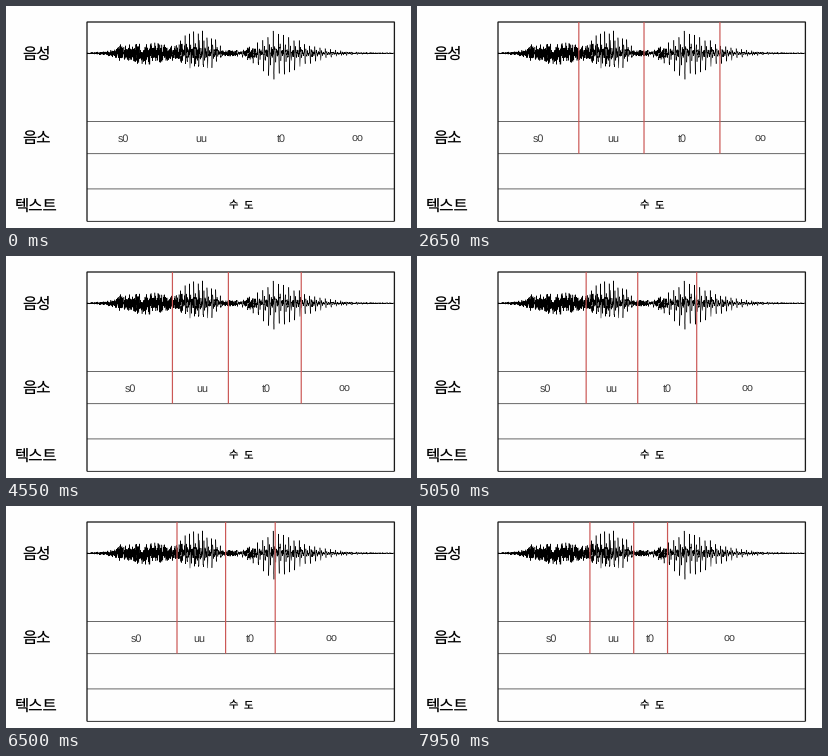
These frames come from a looping animation (405 by 222 pixels, 8000 ms). A matplotlib script:

```python
import numpy as np
import matplotlib.pyplot as plt
from matplotlib.animation import FuncAnimation

W, H, DPI = 405, 222, 100
STEP, LOOP = 50, 8000
PX = 72 / DPI  # points per pixel
LEFT, RIGHT, TOP, SPLIT, BOTTOM = 81, 388.4, 16, 147.6, 215.4
MID = 47.2
CJK = "Noto Sans CJK JP"

plt.rcParams["text.hinting"] = "none"
fig = plt.figure(figsize=(W / DPI, H / DPI), dpi=DPI, facecolor="#fefefe")
ax = fig.add_axes([0, 0, 1, 1])
ax.set_xlim(0, W)
ax.set_ylim(H, 0)
ax.axis("off")


def line(xs, ys, color, width, z=2):
    return ax.plot(xs, ys, color=color, lw=width * PX, zorder=z, snap=False,
                   solid_capstyle="butt", solid_joinstyle="miter")[0]


def label(x, y, text, size, font=CJK, color="black"):
    return ax.text(x, y, text, fontsize=size * PX, family=font, color=color,
                   ha="center", va="baseline", zorder=4)


def bump(x, centre, height, rise, fall, power):
    d = np.where(x < centre, (centre - x) / rise, (x - centre) / fall)
    return height * np.exp(-d ** power)


def voice(x, period, envelope, depth):
    """Ringing pulses whose lower half is scaled by depth."""
    ph = (x / period) % 1
    ring = np.cos(6 * np.pi * ph) * np.exp(-3 * ph)
    return envelope * np.where(ring < 0, ring * depth, ring)


def waveform():
    rng = np.random.default_rng(7)
    x = np.linspace(LEFT, RIGHT - 1, 3000)
    uu = bump(x, 192, 21, 22, 22, 4)
    oo = bump(x, 267, 21, 20, 40, 1.5)
    hiss = (.4 + bump(x, 139, 9, 30, 36, 2) + bump(x, 113.5, 4, 2, 2, 2)
            + bump(x, 225, 2, 8, 8, 2) + bump(x, 243, 4, 4, 6, 2)
            + .15 * (uu + oo))
    noise = hiss * np.clip(rng.normal(0, .55, x.size), -1.2, 1.2)
    wave = noise + voice(x - 174.5, 4.4, uu, 1.1) + voice(x - 251.5, 5.2, oo, 1.75)
    return x, MID - wave


# table
for y in (115.5, SPLIT, 182.9):
    line([LEFT, RIGHT], [y, y], "#6a6a6a", 1)
line([LEFT, LEFT, RIGHT, RIGHT], [BOTTOM, TOP, TOP, BOTTOM], "#1a1a1a", 1.3)
line([LEFT, RIGHT], [BOTTOM, BOTTOM], "#333333", 1)
line(*waveform(), "black", .5, 3)

for y, word in ((52.4, "음성"), (136.8, "음소"), (204.3, "텍스트")):
    label(30.6, y, word, 15.5)
for x, word in ((227.2, "수"), (242.2, "도")):
    label(x, 202.5, word, 10.3)

# divider and phoneme positions at each stage of the alignment
DIVIDERS = np.array([[154.3, 234.6, 315.3], [166.4, 222.4, 295.4],
                     [171, 219.6, 269.2], [173, 216.6, 249.8]])
CENTRES = np.array([[117.2, 195.2, 275, 351.5], [123.9, 196.5, 260.2, 338.8],
                    [130.6, 193.6, 244.4, 325.2], [134.2, 196.2, 233.2, 312.2]])
STARTS, SPAN = (2110, 4530, 6820), 1500

bars = [line([0, 0], [TOP, SPLIT], "#cb5856", 1.2, 3.5) for _ in range(3)]
names = [label(0, 136, s, 10.8, "Liberation Sans", "#3a3a3a")
         for s in ("s0", "uu", "t0", "oo")]


def ease(u):
    """Cubic Bezier easing with handles (.25, .1) and (.25, 1)."""
    s = np.linspace(0, 1, 400)
    r = 1 - s
    x = .75 * r * r * s + .75 * r * s * s + s ** 3
    y = .3 * r * r * s + 3 * r * s * s + s ** 3
    return np.interp(u, x, y)


def blend(poses, t):
    weights = ease((t - np.array(STARTS)) / SPAN)
    return poses[0] + weights @ np.diff(poses, axis=0)


def draw(i):
    t = i * STEP
    alpha = np.clip((t - 150) / 350, 0, 1)
    for bar, x in zip(bars, blend(DIVIDERS, t)):
        bar.set_xdata([x, x])
        bar.set_alpha(alpha)
    for name, x in zip(names, blend(CENTRES, t)):
        name.set_x(x)
    return bars + names


anim = FuncAnimation(fig, draw, frames=LOOP // STEP, interval=STEP,
                     repeat=True, repeat_delay=0, blit=False)
plt.show()
```
